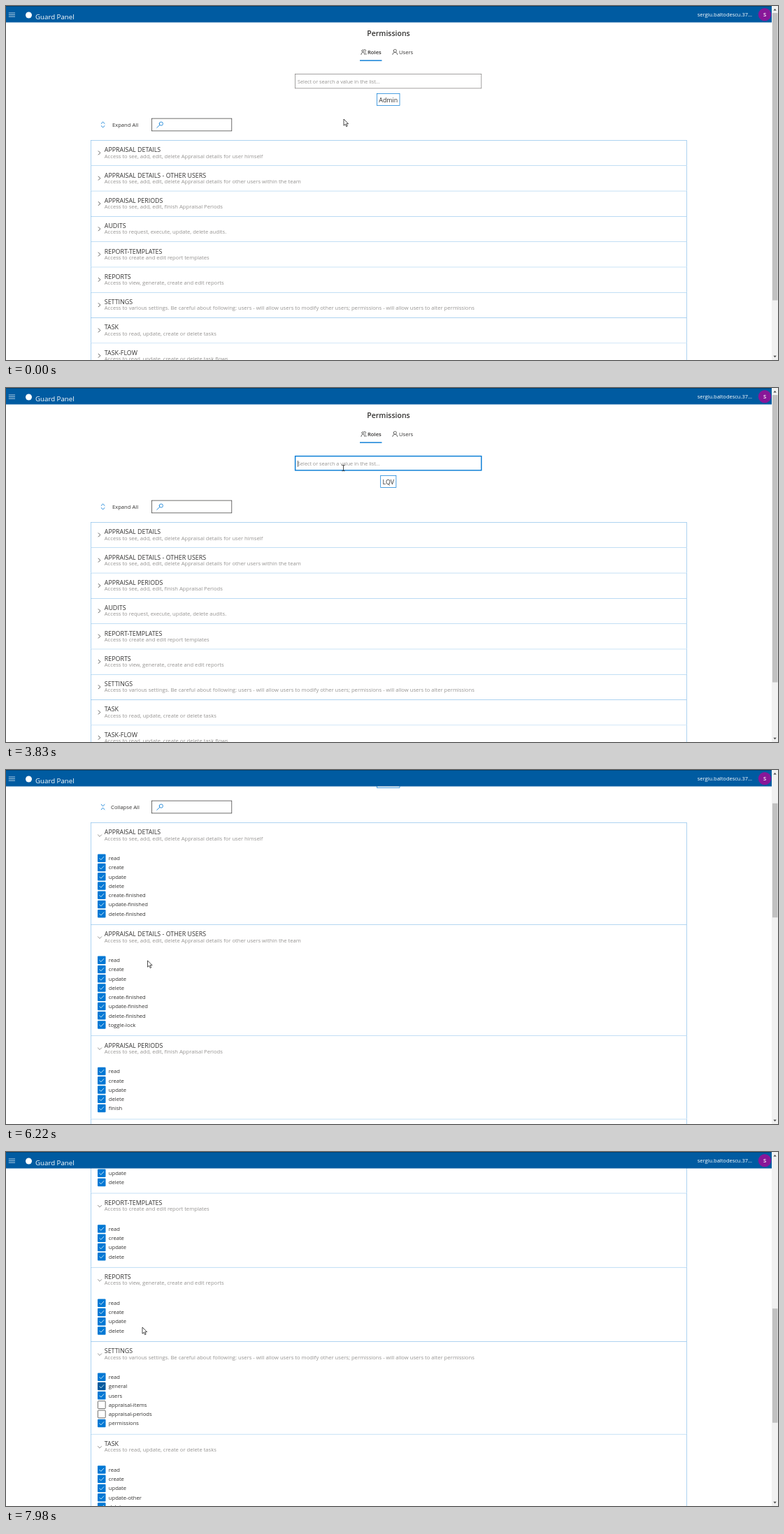
These frames come from a looping animation (1104x507 px, 8 s). An HTML page:

```html
<!DOCTYPE html>
<html lang="en">
<head>
<meta charset="utf-8">
<title>Permissions</title>
<style>
  html, body { margin: 0; width: 100%; height: 100%; overflow: hidden; background: #fff; }
  svg { display: block; }
  #stage { width: 100vw; height: 100vh; }
  text { font-family: "Open Sans", "Noto Sans", sans-serif; font-size: 7.64px; fill: #323130; white-space: pre; }
  .line { fill: none; stroke-linecap: round; stroke-linejoin: round; }
  .big { font-size: 8.87px; }
  .muted { fill: #969492; }
</style>
</head>
<body>
<svg id="stage" viewBox="0 0 1104 507"></svg>
<script>
const LOOP = 8000, VIEW = 507, ROW = 36.3, ITEM = 13.25, HAIR = 0.7;
const BLUE = '#0078d4', DARK_BLUE = '#005a9e', INK = '#323130', GREY = '#f3f2f1';
const EXPAND_AT = 5487, FOCUS_AT = 2560, BLUR_AT = 5450;
const CRUD = 'read create update delete';

const sections = [
  ['APPRAISAL DETAILS', 'Access to see, add, edit, delete Appraisal details for user himself',
    CRUD + ' create-finished update-finished delete-finished'],
  ['APPRAISAL DETAILS - OTHER USERS', 'Access to see, add, edit, delete Appraisal details for other users within the team',
    CRUD + ' create-finished update-finished delete-finished toggle-lock'],
  ['APPRAISAL PERIODS', 'Access to see, add, edit, finish Appraisal Periods', CRUD + ' finish'],
  ['AUDITS', 'Access to request, execute, update, delete audits.', CRUD],
  ['REPORT-TEMPLATES', 'Access to create and edit report templates', CRUD],
  ['REPORTS', 'Access to view, generate, create and edit reports', CRUD],
  ['SETTINGS', 'Access to various settings. Be careful about following: users - will allow users to modify other users; permissions - will allow users to alter permissions',
    'read general users appraisal-items appraisal-periods permissions'],
  ['TASK', 'Access to read, update, create or delete tasks', 'read create update update-other delete delete-other'],
  ['TASK-FLOW', 'Access to read, update, create or delete task flows', CRUD]
];
const unchecked = ['appraisal-items', 'appraisal-periods'];
const roles = ['Admin', 'LQV', 'Manager', 'Team lead', 'Employee', 'Guest'];

// time, x, y of the pointer's hot spot
const pointerPath = [
  [70, 483, 162], [130, 502, 127], [270, 502, 127], [600, 530, 107], [850, 490, 68], [1090, 485, 60],
  [1250, 520, 70], [1400, 568, 66], [1500, 604, 90], [1640, 552, 132], [1970, 552, 132],
  [2200, 519.5, 77.5], [2300, 519.5, 77.5], [2520, 483, 110], [2640, 483, 112], [2780, 484, 140],
  [2960, 490, 152], [3240, 490, 152], [3610, 482.5, 116], [3950, 482.5, 114], [4200, 486, 131],
  [4810, 486, 131], [5210, 166, 170], [5740, 165.5, 170], [6050, 203, 268], [6220, 202.5, 273],
  [6500, 195, 251]
];
const scrollPath = [
  [6050, 0], [6150, 66], [6220, 116.5], [6560, 288], [6900, 461.4], [6980, 461.4],
  [7100, 590], [7310, 747.5], [7590, 747.5], [7980, 664.2]
];

const stage = document.getElementById('stage');

function add(parent, tag, attrs = {}, content) {
  const node = document.createElementNS('http://www.w3.org/2000/svg', tag);
  set(node, attrs);
  if (content !== undefined) node.textContent = content;
  parent.appendChild(node);
  return node;
}
function set(node, attrs) {
  for (const key in attrs) node.setAttribute(key, attrs[key]);
}
const show = (node, on) => node.setAttribute('visibility', on ? 'visible' : 'hidden');
const rect = (parent, x, y, width, height, fill, extra) =>
  add(parent, 'rect', { x, y, width, height, fill, ...extra });
const text = (parent, x, y, content, extra) => add(parent, 'text', { x, y, ...extra }, content);
const line = (parent, d, stroke, width = 1) =>
  add(parent, 'path', { d, stroke, 'stroke-width': width, class: 'line' });
const inside = (x, y, [left, top, w, h]) => x >= left && x < left + w && y >= top && y < top + h;
const between = (t, from, to) => t >= from && t < to;

function sample(path, t) {
  const next = path.findIndex(key => key[0] > t);
  if (next === 0) return path[0].slice(1);
  if (next < 0) return path[path.length - 1].slice(1);
  const a = path[next - 1], b = path[next], k = (t - a[0]) / (b[0] - a[0]);
  return a.slice(1).map((v, i) => v + (b[i + 1] - v) * k);
}

const area = {
  roles: [502, 54, 40, 25], users: [547, 54, 40, 25], input: [413, 97, 267, 21],
  expand: [129, 157, 70, 26], list: [413, 119, 267, 131]
};
const optionTop = i => 122 + i * 20.7;

// Page content
const page = add(stage, 'g');
text(page, 547, 43, 'Permissions', { 'text-anchor': 'middle', style: 'font-size:10.5px;font-weight:600' });

const hoverBox = key => rect(page, ...area[key], GREY);
const rolesHover = hoverBox('roles'), usersHover = hoverBox('users'), expandHover = hoverBox('expand');

const person = (x, r) => `M${x - r} 64.2a${r} ${r} 0 1 0 ${2 * r} 0a${r} ${r} 0 1 0 ${-2 * r} 0` +
  `M${x - 1.7 * r} 69.6a${1.7 * r} 3.2 0 0 1 ${3.4 * r} 0`;
line(page, person(510.4, 1.5), INK, HAIR);
line(page, 'M512.4 62.4a1.5 1.5 0 1 1 1 2.8M513.4 66.4q1.6 .8 1.6 3.2', INK, HAIR);
line(page, person(556.3, 2.1), INK, HAIR);
text(page, 517, 68.8, 'Roles', { style: 'font-weight:600' });
text(page, 562, 68.8, 'Users');
rect(page, 506, 77.4, 31.5, 1.4, BLUE);

const input = rect(page, 413.6, 97.6, 266.2, 20.3, '#fff');
text(page, 417, 111, 'Select or search a value in the list...', { class: 'muted', style: 'font-size:7.26px' });
const caret = rect(page, 417, 104, 0.7, 9, INK);

const tags = [['Admin', 32.4], ['LQV', 22.2]].map(([name, width]) => {
  const tag = add(page, 'g');
  rect(tag, 546.8 - width / 2, 125.6, width, 17, '#fff', { stroke: BLUE, 'stroke-width': HAIR });
  text(tag, 546.8, 137.5, name, { 'text-anchor': 'middle', class: 'big' });
  return tag;
});

const expandIcon = line(page, '', BLUE, 0.9);
const expandLabel = text(page, 170.5, 172.8, '', { 'text-anchor': 'middle' });
rect(page, 208.4, 161.1, 114.4, 17.8, '#fff', { stroke: INK, 'stroke-width': HAIR });
line(page, 'M219.2 168.6a2.6 2.6 0 1 0 5.2 0a2.6 2.6 0 1 0 -5.2 0M219.8 170.5l-4 3.8', BLUE, 0.8);

const panels = sections.map(([title, about, names]) => {
  const box = add(page, 'svg', { x: 121, width: 853 });
  const frame = rect(box, 0.5, HAIR / 2, 852, 10, 'none', { stroke: '#8cc1eb', 'stroke-width': HAIR });
  const chevron = line(box, '', INK, 0.8);
  text(box, 19.8, 17.4, title, { class: 'big' });
  text(box, 19.8, 25.6, about, { class: 'muted' });
  const items = add(box, 'g');
  const checks = names.split(' ').map((name, i) => {
    const y = 51.4 + i * ITEM, off = unchecked.includes(name);
    const check = off
      ? rect(items, 10.4, y - 5.4, 10.8, 10.8, '#fff', { stroke: INK, 'stroke-width': HAIR, rx: 0.8 })
      : rect(items, 10, y - 5.8, 11.5, 11.5, BLUE, { rx: 1 });
    if (!off) line(items, `M12.8 ${y + 0.2}l2 2l4 -4.2`, '#fff', 0.8);
    text(items, 25.8, y + 2.8, name);
    return check;
  });
  return { box, frame, chevron, items, checks, full: 53.2 + checks.length * ITEM };
});

// Role list
const list = add(page, 'g');
rect(list, 411, 119, 271, 135, '#000', { opacity: 0.04, rx: 2 });
rect(list, 412, 119, 269, 133, '#000', { opacity: 0.07, rx: 1 });
rect(list, ...area.list, '#fff');
const options = roles.map((name, i) => {
  const back = rect(list, 413, optionTop(i), 267, 20.7, '#fff');
  text(list, 418, optionTop(i) + 13.1, name);
  return back;
});

// Header
rect(stage, 0, 0, 1095, 23.5, '#005ba1');
rect(stage, 0, 0, 1104, 0.8, '#000', { opacity: 0.35 });
line(stage, 'M4.2 10h8.4M4.2 12.6h8.4M4.2 15.2h8.4', '#fff', HAIR);
add(stage, 'circle', { cx: 32.5, cy: 13, r: 4.5, fill: '#fff' });
text(stage, 42, 19.4, 'Guard Panel', { style: 'font-size:9.7px;fill:#fff' });
text(stage, 1067, 15.2, 'sergiu.baltodescu.37...', { 'text-anchor': 'end', style: 'fill:#fff;font-size:7.5px' });
add(stage, 'circle', { cx: 1085, cy: 12.3, r: 9.2, fill: '#881798' });
text(stage, 1085, 15, 'S', { 'text-anchor': 'middle', style: 'fill:#fff;font-weight:600' });

// Scrollbar
rect(stage, 1095, 0, 9, VIEW, '#f1f1f1');
const thumb = rect(stage, 1096, 10, 7.5, 10, '#c1c1c1');
add(stage, 'path', { d: 'M1097.4 6.4h4.4l-2.2 -2.6zM1097.4 500.8h4.4l-2.2 2.6z', fill: '#505050' });

// Pointers, each with its hot spot at 0,0
const pointers = {
  arrow: add(stage, 'path', {
    d: 'M0 0V9.2L2.2 7.3L3.7 10.7L5.2 10L3.7 6.7H6.6Z', fill: '#fff', stroke: '#000', 'stroke-width': HAIR, 'stroke-linejoin': 'round'
  }),
  hand: add(stage, 'path', {
    d: 'M-1 .8Q0 -.8 1 .8V4.6Q2 3.9 2.9 4.8Q3.9 4.2 4.6 5.2Q5.8 4.8 6.2 6V9Q6.2 11 5 12.6H-.6Q-1.6 10.6 -3.2 8.4Q-3.6 6.8 -2.2 7L-1 8Z',
    fill: '#fff', stroke: '#000', 'stroke-width': HAIR, 'stroke-linejoin': 'round'
  }),
  beam: line(stage, 'M-1.8 -4H-.5L0 -3.6L.5 -4H1.8M0 -3.6V3.6M-1.8 4H-.5L0 3.6L.5 4H1.8', '#222', 0.8)
};

function render(t) {
  const [x, y] = sample(pointerPath, t);
  const scroll = sample(scrollPath, t)[0];
  const over = key => scroll === 0 && inside(x, y, area[key]);
  const open = between(t, 2620, 3240) || between(t, 3950, 4810);
  const focused = between(t, FOCUS_AT, BLUR_AT);
  const second = between(t, 3240, 4810);

  page.setAttribute('transform', `translate(0 ${-scroll})`);
  show(rolesHover, over('roles'));
  show(usersHover, over('users'));
  show(expandHover, over('expand'));
  set(input, {
    stroke: focused ? BLUE : over('input') ? INK : '#7d7b79',
    'stroke-width': focused ? 1.4 : HAIR
  });
  show(caret, focused && (t - FOCUS_AT) % 1060 < 530);
  show(tags[0], !second);
  show(tags[1], second);

  show(list, open);
  options.forEach((back, i) => {
    const hovered = inside(x, y, [413, optionTop(i), 267, 20.7]);
    back.setAttribute('fill', hovered ? GREY : i === +second ? '#edebe9' : '#fff');
  });

  // Expansion of the sections
  const k = Math.min(1, Math.max(0, (t - EXPAND_AT) / 300));
  const grown = 1 - (1 - k) ** 2, expanded = t >= EXPAND_AT;
  expandLabel.textContent = expanded ? 'Collapse All' : 'Expand All';
  expandIcon.setAttribute('d', expanded
    ? 'M136.2 166.4l2.4 2.3l2.4 -2.3M136.2 173.6l2.4 -2.3l2.4 2.3'
    : 'M136.2 168.4l2.4 -2.3l2.4 2.3M136.2 171.6l2.4 2.3l2.4 -2.3');

  let top = 192;
  for (const panel of panels) {
    const height = ROW + (panel.full - ROW) * grown;
    set(panel.box, { y: top, height });
    panel.frame.setAttribute('height', height + 2);
    set(panel.chevron, expanded
      ? { d: 'M10.4 17.8l2.6 2.6l2.6 -2.6', stroke: '#797775' }
      : { d: 'M11.2 15.8l2.6 2.6l-2.6 2.6', stroke: INK });
    show(panel.items, expanded);
    top += height;
  }
  panels[3].checks[3].setAttribute('fill', between(t, 6850, 7380) ? DARK_BLUE : BLUE);
  panels[6].checks[1].setAttribute('fill', t >= 7380 ? DARK_BLUE : BLUE);

  const total = 600 + 910 * grown, track = 487;
  set(thumb, { y: 10 + scroll * track / total, height: VIEW / total * track });

  const kind = open && inside(x, y, area.list) || over('roles') || over('users') || over('expand') ? 'hand'
    : over('input') ? 'beam' : 'arrow';
  for (const name in pointers) {
    show(pointers[name], name === kind);
    pointers[name].setAttribute('transform', `translate(${x} ${y})`);
  }
}

const began = performance.now();
function tick() {
  render((performance.now() - began) % LOOP);
  requestAnimationFrame(tick);
}
tick();
</script>
</body>
</html>
```
